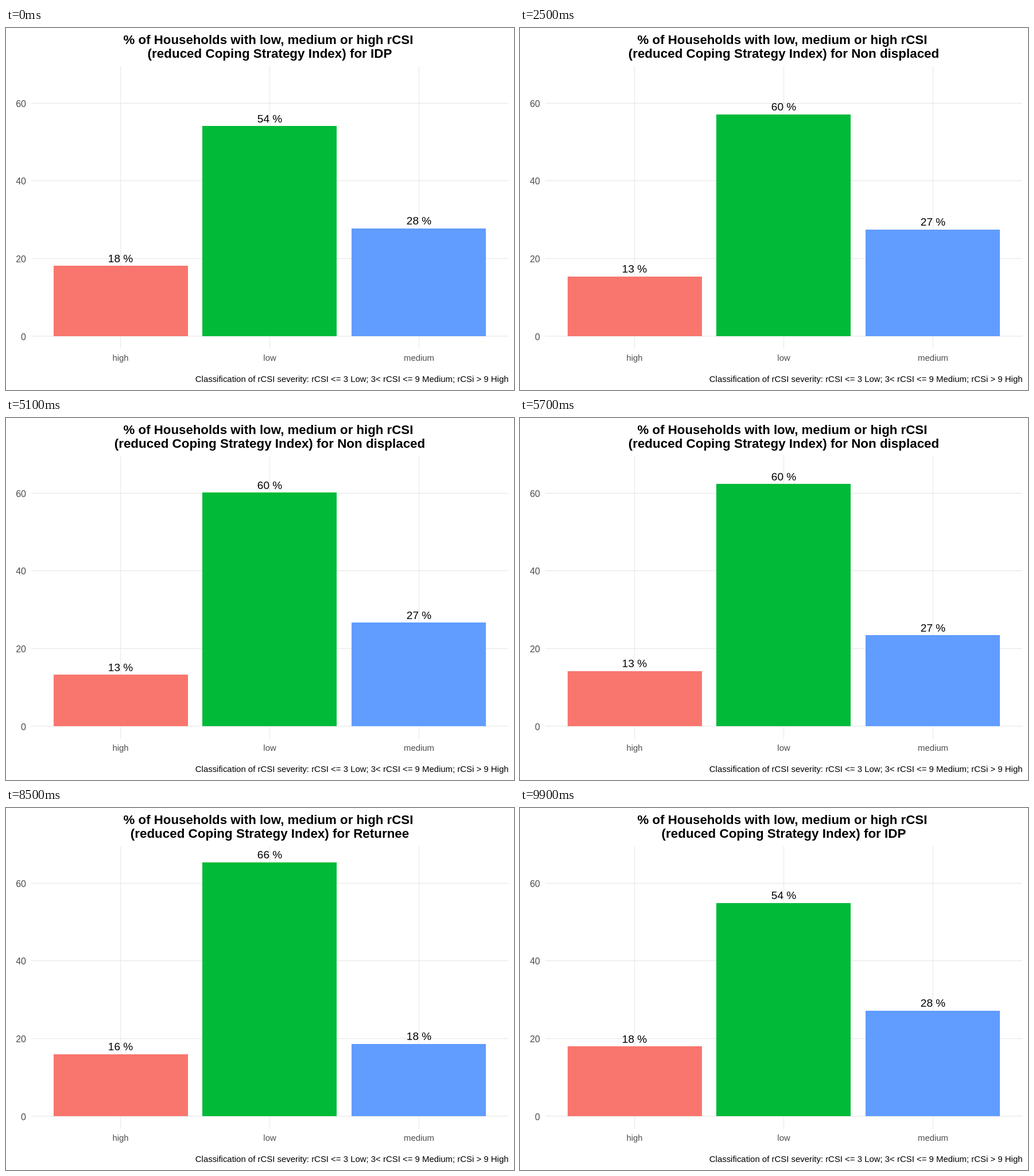
Animation, 885 px wide and 632 px high, one loop 10000 ms. Source, as an HTML page:

```html
<!DOCTYPE html>
<html lang="en">
<head>
<meta charset="utf-8">
<title>rCSI by group</title>
<style>
  html, body { margin: 0; width: 100%; height: 100%; overflow: hidden; background: #fff; }
  svg { display: block; width: 885px; height: 632px; }
  text { font-family: "Liberation Sans", Arial, sans-serif; text-anchor: middle; }
  .title { font-weight: bold; }
  .axis { fill: #4d4d4d; }
  .end { text-anchor: end; }
</style>
</head>
<body>
<svg id="chart" viewBox="0 0 885 632"></svg>
<script>
const chart = document.getElementById('chart');
const LOOP = 10000, STEP = 100;
const BASE = 538, UNIT = 6.775;

const bars = [
  { name: 'high', mid: 199.5, left: 83, color: '#f8766d' },
  { name: 'low', mid: 459.5, left: 342, color: '#00ba38' },
  { name: 'medium', mid: 719.5, left: 602, color: '#619cff' }
];
// top edge of each bar and its rounded share
const groups = [
  { name: 'IDP', tops: [415.4, 171, 349.6], shares: [18, 54, 28] },
  { name: 'Non displaced', tops: [449.6, 133, 353.4], shares: [13, 60, 27] },
  { name: 'Returnee', tops: [430.6, 89.6, 416], shares: [16, 66, 18] }
];
// step of the last still picture and number of steps to the next group
const moves = [
  { start: 16, steps: 17 },
  { start: 50, steps: 17 },
  { start: 84, steps: 16 }
];

function add(tag, attrs, content = '') {
  const el = document.createElementNS('http://www.w3.org/2000/svg', tag);
  for (const key in attrs) el.setAttribute(key, attrs[key]);
  el.textContent = content;
  return chart.appendChild(el);
}

function label(x, y, size, content, cls = '') {
  return add('text', { x, y, 'font-size': size, class: cls }, content);
}

function line(x1, y1, x2, y2) {
  add('line', { x1, y1, x2, y2, stroke: '#ebebeb', 'stroke-width': 1.4 });
}

for (const value of [0, 20, 40, 60]) {
  const y = Math.round(BASE - value * UNIT) - 0.5 + (value === 0 ? 0.5 : 0);
  line(44, y, 875, y);
  label(35, y + 6.5, 16, value, 'axis end');
}
for (const bar of bars) {
  line(bar.mid, 67, bar.mid, 560);
  label(bar.mid, 581, 14.9, bar.name, 'axis');
}
for (const bar of bars) {
  bar.rect = add('rect', {
    x: bar.left, width: 234, fill: bar.color, 'shape-rendering': 'crispEdges'
  });
}
for (const bar of bars) bar.text = label(bar.mid, 0, 19, '');

label(457, 28, 22.25, '% of Households with low, medium or high rCSI', 'title');
const subtitle = label(459.5, 52, 22.42, '', 'title');
label(875.5, 618, 14.93,
  'Classification of rCSI severity: rCSI <= 3 Low; 3< rCSI <= 9 Medium; rCSi > 9 High', 'end');

function draw(ms) {
  const step = Math.floor((ms % LOOP) / STEP);
  let from = groups[0], to = from, p = 0;
  moves.forEach((move, i) => {
    if (step <= move.start) return;
    from = groups[i];
    to = groups[(i + 1) % groups.length];
    p = Math.min(1, (step - move.start) / move.steps);
  });
  const near = p < 0.5 ? from : to;
  subtitle.textContent = `(reduced Coping Strategy Index) for ${near.name}`;
  bars.forEach((bar, i) => {
    const top = from.tops[i] + (to.tops[i] - from.tops[i]) * p;
    bar.rect.setAttribute('y', top);
    bar.rect.setAttribute('height', BASE - top);
    bar.text.setAttribute('y', top - 6.5);
    bar.text.textContent = `${near.shares[i]} %`;
  });
}

const begin = performance.now();
function tick() {
  draw(performance.now() - begin);
  requestAnimationFrame(tick);
}
tick();
</script>
</body>
</html>
```
